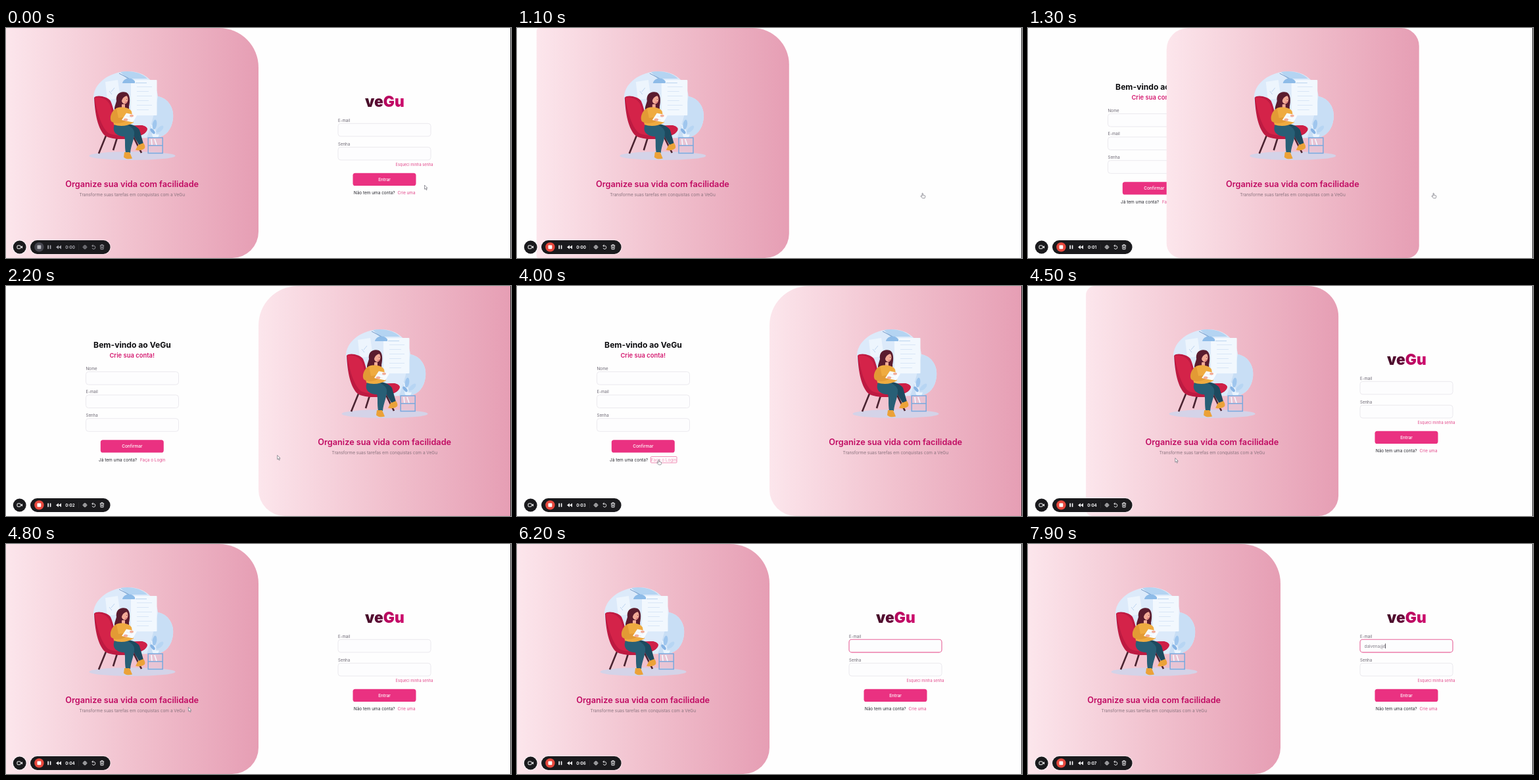
An HTML page with a canvas that plays this animation: 768x350 px, repeating every 8000 ms.

```html
<!DOCTYPE html>
<html lang="pt-BR">
<head>
<meta charset="utf-8">
<title>Login</title>
<style>
html, body { margin: 0; width: 100%; height: 100%; overflow: hidden; background: #fefefe; }
canvas { display: block; width: 768px; height: 350px; }
</style>
</head>
<body>
<canvas id="stage"></canvas>
<script>
const W = 768, H = 350, LOOP = 8000;
const PINK = '#ea3181', DEEP = '#c00a62', INK = '#26262e', GREY = '#6b6672';
const TO_SIGNUP = 984, TO_LOGIN = 4100, SLIDE = 600;
const canvas = document.getElementById('stage');
const ctx = canvas.getContext('2d');
const dpr = window.devicePixelRatio || 1;
canvas.width = W * dpr;
canvas.height = H * dpr;

const clamp = v => Math.max(0, Math.min(1, v));
const mix = (a, b, k) => a + (b - a) * k;

// CSS ease-in-out: cubic-bezier(.42, 0, .58, 1)
function easeInOut(x) {
  x = clamp(x);
  let lo = 0, hi = 1, u = x;
  for (let i = 0; i < 20; i++) {
    u = (lo + hi) / 2;
    const v = 1 - u;
    if (1.26 * v * v * u + 1.74 * v * u * u + u * u * u < x) lo = u; else hi = u;
  }
  return u * u * (3 - 2 * u);
}

function fill(d, color) {
  ctx.fillStyle = color;
  ctx.fill(new Path2D(d));
}

function line(d, color, width = 1) {
  ctx.strokeStyle = color;
  ctx.lineWidth = width;
  ctx.stroke(new Path2D(d));
}

function box(x, y, w, h, r, color, border, width = 1) {
  ctx.beginPath();
  ctx.roundRect(x, y, w, h, r);
  if (color) { ctx.fillStyle = color; ctx.fill(); }
  if (border) { ctx.strokeStyle = border; ctx.lineWidth = width; ctx.stroke(); }
}

function oval(x, y, rx, ry, color, turn = 0) {
  ctx.beginPath();
  ctx.ellipse(x, y, rx, ry, turn, 0, Math.PI * 2);
  ctx.fillStyle = color;
  ctx.fill();
}

// Drawn at 100px and scaled, so small sizes keep exact advances. Returns the width.
function text(s, x, y, size, color, weight = 400, align = 'left') {
  ctx.save();
  ctx.translate(x, y);
  ctx.scale(size / 100, size / 100);
  ctx.font = `${weight} 100px Inter, "Open Sans", sans-serif`;
  ctx.textAlign = align;
  ctx.fillStyle = color;
  ctx.fillText(s, 0, 0);
  const w = ctx.measureText(s).width * size / 100;
  ctx.restore();
  return w;
}

function field(label, x, y, focus = 0) {
  text(label, x, y - 2.2, 6.1, GREY);
  box(x, y + 0.3, 141, 19.6, 4, '#fdfdfe', '#e9e7ed', 0.9);
  if (focus) {
    ctx.globalAlpha = focus;
    box(x, y + 0.3, 141, 19.6, 4, null, '#ee6a9f', 1.1);
    ctx.globalAlpha = 1;
  }
}

function button(label, x, y) {
  box(x, y, 96, 19.3, 3.6, PINK);
  text(label, x + 48, y + 12, 6.5, '#fff', 500, 'center');
}

function link(s, x, y, ring, w) {
  text(s, x, y, 6.35, ring ? '#f08db5' : '#e2478a');
  if (ring) box(x - 0.5, y - 7, w, 9.4, 1, null, '#ef7dab', 0.9);
}

const MAIL = 'dalvena@t';
const KEYS = [6600, 6700, 6800, 7000, 7100, 7200, 7300, 7700, 7900];
const FOCUS = 5700;

function loginForm(t) {
  const g = ctx.createLinearGradient(0, 0, 258, 0);
  g.addColorStop(0, '#420e27');
  g.addColorStop(0.47, '#6a0a3c');
  g.addColorStop(0.49, '#b5075d');
  g.addColorStop(1, '#cc0a6c');
  text('veGu', 546, 119.6, 22.8, g, 900);

  field('E-mail', 505, 145, clamp((t - FOCUS) / 200));
  field('Senha', 505, 181);
  if (t >= FOCUS) {
    const n = KEYS.filter(k => t >= k).length;
    const w = n ? text(MAIL.slice(0, n), 511.5, 157.5, 6.4, '#85808a') : 0;
    const since = t - (n ? KEYS[n - 1] : FOCUS);
    if (since % 1000 < 500) box(511.3 + w, 151.5, 0.8, 7.5, 0, '#3a3640');
  }
  text('Esqueci minha senha', 649.5, 210, 5.7, '#e2478a', 400, 'right');
  button('Entrar', 527.5, 220.7);
  text('Não tem uma conta?', 528.8, 253, 6.45, INK);
  link('Crie uma', 595.5, 253, t > 880 && t < TO_SIGNUP, 27.5);
}

function signupForm(t) {
  text('Bem-vindo ao VeGu', 192, 94.3, 12.15, '#0d0d10', 700, 'center');
  text('Crie sua conta!', 191.7, 108.6, 9.4, '#d4186f', 600, 'center');
  field('Nome', 121.5, 130.2);
  field('E-mail', 121.5, 165.6);
  field('Senha', 121.5, 201.4);
  button('Confirmar', 143.8, 234.2);
  text('Já tem uma conta?', 141, 266.6, 6.5, INK);
  link('Faça o Login', 204, 266.6, t > 3950 && t < TO_LOGIN, 39.5);
}

function room() {
  fill('M133 108C132 84 158 66 186 66C212 66 229 83 231 104C247 107 256 122 254 138C252 155 243 164 231 167L160 168C142 152 134 130 133 108Z', '#dceafa');
  fill('M231 104C247 107 256 122 254 138C252 155 243 164 231 167L214 167C220 150 226 130 231 104Z', '#c8def5');
  fill('M174 67C190 64 206 68 215 77L184 77Z', '#b4d4f2');
  box(190, 79, 39.5, 54, 1, '#f2f8fe');
  box(197, 83, 17, 1.1, 0, '#bdd6f0');
  for (let i = 0; i < 6; i++) box(199, 89 + i * 7, i % 2 ? 18 : 23, 0.8, 0, '#d3e3f5');
  fill('M151 82L170 79L174 107L154 109Z', '#edf5fd');
  line('M160 97l5 -6M157 96l4 5', '#a9c6e8', 0.7);
  line('M172 69L187 77', '#6d94c2', 0.9);
  fill('M177 84C178 77 190 73 196 81L196 84Z', '#8dbbe8');
  oval(192, 194.5, 65.5, 6.5, '#d4d3e8');
}

function crate() {
  fill('M224 166C220 157 222 150 219 146C227 149 229 158 228 166Z', '#e6f1fc');
  oval(226, 147, 3.2, 7.5, '#9fc6ee', 0.15);
  oval(234, 154, 3.2, 7, '#b7d5f3', 0.8);
  oval(223, 157, 2.3, 5, '#86b3e4', -0.7);
  fill('M222 162h11l-2 5h-7Z', '#eaf4fd');
  box(216.2, 167, 22, 23.5, 0, 'rgba(226,205,224,.5)', '#7aa9de', 1.5);
  line('M216 178.8h22.5', '#7aa9de', 1.5);
  line('M221 169l1 9M226 169l3 9', '#f4f9ff', 1.7);
}

function chair() {
  const legs = '#4b2431';
  line('M152 164L141 191M169 167L163 186', legs, 2.6);
  line('M193 164L206 190', legs, 2.6);
  fill('M134 106C138 101 154 104 159 111C165 124 165 140 174 149L206 148C216 149 216 157 210 161C196 170 163 172 151 164C140 155 135 130 134 106Z', '#bd1a41');
  fill('M135 106C144 104 154 108 158 117C163 132 164 146 172 155L196 157C184 164 165 165 156 160C144 150 138 126 135 106Z', '#d42349');
  fill('M190 151C202 146 215 148 215 154C214 161 201 164 191 163Z', '#cf2047');
}

function woman() {
  const hair = '#5a1c2e', skin = '#f2ab97', shirt = '#efab40', shoe = '#eba238';
  fill('M168 111C166 100 175 95 183 98C189 101 189 111 187 120C189 127 179 128 169 127C162 126 166 119 168 111Z', hair);
  fill('M202 172L207 175L210 181L204 182Z', skin);
  fill('M170 146C184 143 198 148 203 155L209 176L203 179L192 161L172 160Z', '#1d4a5f');
  fill('M166 145C178 144 193 149 195 158C196 168 190 178 189 190L182 190C180 178 182 172 180 165C169 165 159 158 166 145Z', '#285f76');
  fill('M180 189h8l4 9.5c-5 1.5 -10 1 -13 -2Z', shoe);
  fill('M201 178l8 -3c2 3 3 5 2 8c-3 3 -9 4 -14 2.5Z', shoe);
  box(176, 116, 5, 7, 1, skin);
  fill('M168 122C176 119 188 121 191 127L194 144C184 150 172 150 164 147C163 140 161 128 168 122Z', shirt);
  fill('M168 122C160 126 157 137 160 142C166 147 178 145 186 140L184 135L171 137Z', '#e39a35');
  oval(180.5, 108.5, 5, 7.2, skin);
  fill('M173 112C171 100 180 97 186 103C181 103 177 106 176 111Z', hair);
  box(183, 108, 1.2, 0.8, 0, hair);
  line('M181 113q2 1 3 -.5', '#c4415b', 0.8);
  fill('M176 140L183 129.5L199 133L193 143.5Z', '#f8fbff');
  line('M183 134l9 2M181 138l8 2', '#dbe5f3', 0.7);
  oval(182, 139.5, 3.2, 2, skin);
  oval(191, 133.5, 3, 1.8, skin);
}

function panel(p) {
  const q = 1 - p;
  ctx.save();
  ctx.translate(384 * p, 0);
  const g = ctx.createLinearGradient(0, 0, 384, 0);
  g.addColorStop(0, '#fce6ec');
  g.addColorStop(0.5, '#f1c1ce');
  g.addColorStop(1, '#e69eb4');
  box(0, 0, 384, H, [60 * p, 60 * q, 40 * q, 40 * p], g);
  room();
  crate();
  chair();
  woman();
  text('Organize sua vida com facilidade', 191.7, 242.3, 12.7, DEEP, 600, 'center');
  text('Transforme suas tarefas em conquistas com a VeGu', 191.8, 255.5, 6.5, '#8a737e', 400, 'center');
  ctx.restore();
}

function toolbar(t) {
  const live = t >= 300, c = live ? '#f4f4f6' : '#a3a3aa', dark = '#1a1a1d';
  oval(20.7, 333.5, 10.8, 10.8, 'rgba(255,255,255,.7)');
  oval(20.7, 333.5, 9.9, 9.9, dark);
  box(17, 331, 5.2, 4.8, 1, null, '#fff', 1);
  fill('M22.6 333L25 331.2V335.6L22.6 333.8Z', '#fff');
  box(36.1, 322.2, 123.4, 22.6, 11.3, 'rgba(255,255,255,.5)');
  box(37, 323.1, 121.6, 20.8, 10.4, dark);
  oval(50.4, 333.4, 7.2, 7.2, live ? '#e8483d' : '#46464f');
  box(47.5, 330.5, 5.8, 5.8, 1, live ? '#fff' : '#b9b9c0');
  box(63.3, 330.5, 1.7, 5.8, 0.4, c);
  box(66.7, 330.5, 1.7, 5.8, 0.4, c);
  fill('M80 330.4V336.4L76 333.4ZM84 330.4V336.4L80 333.4Z', c);
  const sec = Math.max(0, Math.floor((t - 170) / 970));
  text('0:0' + sec, 97.5, 335.6, 6.2, c, 700, 'center');
  box(110.3, 329, 0.6, 9, 0, '#303035');
  line('M120 329.8v7.2M116.4 333.4h7.2M118 331.4v4M122 331.4v4M118 331.4h4M118 335.4h4', c, 0.7);
  line('M131 331.4h2.4a2.5 2.5 0 1 1 -2.4 3.4M132.6 329.6l-1.8 1.8l1.8 1.8', c, 0.9);
  line('M142.8 331h6.4M144.8 331v-1.3h2.4v1.3M143.6 331l.4 5.7h4l.4 -5.7M145.3 332.6v2.6M146.7 332.6v2.6', c, 0.9);
}

// time, x, y of the pointer tip
const PATH = [
  [300, 636.5, 239], [800, 616, 251], [1850, 616, 251], [2200, 413, 257.5],
  [2700, 236, 262], [3400, 214.8, 264], [4450, 214.8, 264], [4800, 277, 248.5],
  [5200, 470, 180], [5600, 600, 154]
];

function pointer(t) {
  if (t >= 5900) return;
  let i = PATH.findIndex(k => k[0] > t);
  if (i < 0) i = PATH.length - 1;
  const b = PATH[i], a = PATH[Math.max(0, i - 1)];
  const k = a === b ? 0 : clamp((t - a[0]) / (b[0] - a[0]));
  const hand = (t > 700 && t < 1900) || (t > 3300 && t < 4500);
  const shape = hand
    ? 'M0 .8Q.7 -.2 1.4 .8V3.4L4.6 4.2Q5.2 5 4.6 6.6L4 8H.6L-2 5.2Q-2 4 -1 4.4L0 5.2Z'
    : 'M0 0V6.4L1.5 5.1L2.6 7.6L3.7 7.1L2.6 4.7H4.5Z';
  const edge = '#7d7d86';
  ctx.save();
  ctx.translate(mix(a[1], b[1], k), mix(a[2], b[2], k));
  if (t > 5450) line('M-1 -3h2M0 -3v6M-1 3h2', edge, 0.8);
  else {
    fill(shape, '#fff');
    line(shape, edge, 0.8);
  }
  ctx.restore();
}

function draw(t) {
  ctx.setTransform(dpr, 0, 0, dpr, 0, 0);
  ctx.fillStyle = '#fefefe';
  ctx.fillRect(0, 0, W, H);
  if (t >= TO_SIGNUP && t < TO_LOGIN) signupForm(t); else loginForm(t);
  panel(easeInOut((t - TO_SIGNUP) / SLIDE) - easeInOut((t - TO_LOGIN) / SLIDE));
  box(767, 0, 1, H, 0, '#2a2a2c');
  toolbar(t);
  pointer(t);
}

const start = performance.now();
function tick() {
  draw((performance.now() - start) % LOOP);
  requestAnimationFrame(tick);
}
tick();
</script>
</body>
</html>
```
